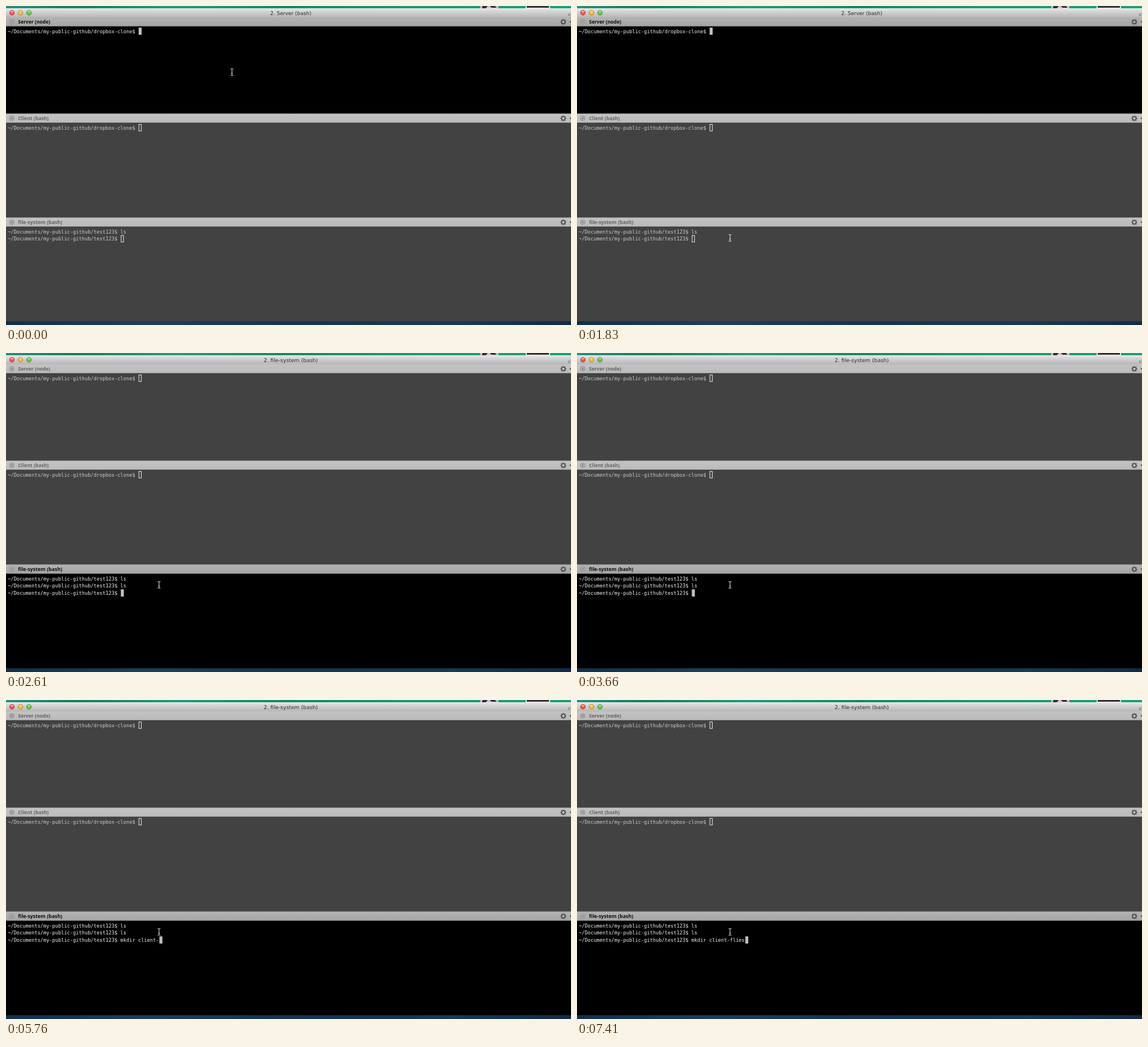
An HTML page for the animation above (8000 ms loop, 996 by 562 pixels).

```html
<!DOCTYPE html>
<html lang="en">
<head>
<meta charset="utf-8">
<title>Terminal panes</title>
<style>
  html, body { margin: 0; width: 100%; height: 100%; overflow: hidden; background: #424242; }
  svg { display: block; width: 100vw; height: 100vh; }
  text { white-space: pre; }
  .mono { font: 8.69px "DejaVu Sans Mono", monospace; }
  .title { font-family: "DejaVu Sans", sans-serif; text-anchor: middle; fill: #2b2b2b; }
  .tab { font-family: "Open Sans", sans-serif; font-weight: 700; }
</style>
</head>
<body>
<svg id="stage" viewBox="0 0 996 562" preserveAspectRatio="none">
  <defs>
    <linearGradient id="sky">
      <stop offset="0" stop-color="#2a8f80"/><stop offset=".12" stop-color="#12805f"/>
      <stop offset=".3" stop-color="#249a7c"/><stop offset=".5" stop-color="#158a63"/>
      <stop offset=".72" stop-color="#1a9a70"/><stop offset="1" stop-color="#19a272"/>
    </linearGradient>
    <linearGradient id="sea">
      <stop offset="0" stop-color="#12304a"/><stop offset=".25" stop-color="#1b4058"/>
      <stop offset=".5" stop-color="#16344e"/><stop offset=".8" stop-color="#153a55"/>
      <stop offset="1" stop-color="#122b44"/>
    </linearGradient>
    <linearGradient id="bar" x2="0" y2="1">
      <stop offset="0" stop-color="#ececec"/><stop offset=".15" stop-color="#dedede"/>
      <stop offset="1" stop-color="#b5b5b5"/>
    </linearGradient>
    <linearGradient id="tabOn" x2="0" y2="1">
      <stop offset="0" stop-color="#b2b2b2"/><stop offset="1" stop-color="#a4a4a4"/>
    </linearGradient>
    <linearGradient id="tabOff" x2="0" y2="1">
      <stop offset="0" stop-color="#c3c3c3"/><stop offset="1" stop-color="#bababa"/>
    </linearGradient>
  </defs>
</svg>
<script>
const LOOP = 8000, CELL = 5.232, LEFT = 3.2, ROW = 12.65;
const stage = document.getElementById('stage');

function add(tag, attrs, parent = stage) {
  const el = document.createElementNS('http://www.w3.org/2000/svg', tag);
  set(el, attrs);
  parent.appendChild(el);
  return el;
}
function set(el, attrs) {
  for (const k in attrs) el.setAttribute(k, attrs[k]);
}
const rect = (x, y, width, height, fill, parent) => add('rect', { x, y, width, height, fill }, parent);
const write = (el, s) => { if (el.textContent !== s) el.textContent = s; };

// Value of the last [time, value] step reached
function at(steps, t) {
  let value = steps[0][1];
  for (const [time, v] of steps) if (t >= time) value = v;
  return value;
}

function drawDesktop() {
  rect(0, 0, 996, 5, 'url(#sky)');
  rect(836, 0, 32, 4, '#cfc3cb');
  add('path', { d: 'M840 0h9l-3 4h-7zM853 0h9l3 3h-9z', fill: '#33283c' });
  rect(916, 0, 43, 4, '#e4e4e4');
  rect(918, 0, 39, 3, '#35313a');
  rect(0, 555, 996, 7, 'url(#sea)');
}

function drawTitleBar() {
  rect(0, 4, 996, 16.5, 'url(#bar)');
  [['#f2564f', '#a8332e'], ['#f5b83c', '#a87a20'], ['#6cc04a', '#3f8330']].forEach(([fill, stroke], i) => {
    const cx = 10.5 + i * 15;
    add('circle', { cx, cy: 12, r: 4.2, fill, stroke, 'stroke-width': .8 });
    add('ellipse', { cx, cy: 10, rx: 2.3, ry: 1.2, fill: '#fff', opacity: .6 });
  });
  add('path', { d: 'M991.5 16.5l5-5M991.5 13v3.5h3.5', fill: 'none', stroke: '#858585' });
  return add('text', { class: 'title', x: 502, y: 15.6 });
}

function drawGear(x, y) {
  const g = add('g', { transform: `translate(${x} ${y})`, stroke: '#484848', fill: 'none' });
  add('circle', { r: 3.1, 'stroke-width': 1.5 }, g);
  for (let a = 0; a < 360; a += 45)
    add('path', { d: 'M0-3.4V-5.2', 'stroke-width': 1.5, transform: `rotate(${a})` }, g);
  add('path', { d: 'M993.2-1.2h4.6l-2.3 3z', fill: '#484848', stroke: 'none', transform: `translate(${-x} 0)` }, g);
}

function makePane(top, bottom, label, size, path) {
  const y = top + 16, prompt = path + '$ ';
  const body = rect(0, y, 996, bottom - y);
  const tab = rect(0, top, 996, 16);
  rect(0, y - .4, 996, .7, '#303030');
  if (top > 30) rect(0, top - .6, 996, .8, '#929292');
  add('circle', { cx: 10.2, cy: top + 7.8, r: 4, fill: '#b9b9b9', stroke: '#797979', 'stroke-width': .8 });
  add('path', { d: `M8.5 ${top + 6.1}l3.4 3.4m0-3.4l-3.4 3.4`, stroke: '#656565', 'stroke-width': 1 });
  const name = add('text', { class: 'tab', x: 21.3, y: top + 11.1, 'font-size': size });
  name.textContent = label;
  drawGear(982.5, top + 8);
  const rows = [0, 1, 2].map(i => add('text', { class: 'mono', x: LEFT, y: y + 11.6 + i * ROW }));
  const caret = add('rect', { 'stroke-width': 1 });

  return (active, lines) => {
    body.setAttribute('fill', active ? '#000' : '#424242');
    tab.setAttribute('fill', active ? 'url(#tabOn)' : 'url(#tabOff)');
    name.setAttribute('fill', active ? '#0c0c0c' : '#646464');
    rows.forEach((row, i) => {
      write(row, i < lines.length ? prompt + lines[i] : '');
      row.setAttribute('fill', active ? '#f0f0f0' : '#cbcbcb');
    });
    const last = lines.length - 1;
    const x = LEFT + .4 + (prompt.length + lines[last].length) * CELL;
    const inset = active ? 0 : .5;
    set(caret, {
      x: x + inset, y: y + 2.1 + last * ROW + inset,
      width: 5.3 - inset * 2, height: 12.6 - inset * 2,
      fill: active ? '#c0c0c0' : 'none', stroke: active ? 'none' : '#ededed'
    });
  };
}

drawDesktop();
const title = drawTitleBar();
const repo = '~/Documents/my-public-github/';
const server = makePane(20, 189.5, 'Server (node)', 8.5, repo + 'dropbox-clone');
const client = makePane(190, 372.5, 'Client (bash)', 8.63, repo + 'dropbox-clone');
const files = makePane(373, 555.3, 'file-system (bash)', 8.86, repo + 'test123');
const pointer = add('path', {
  d: 'M-2.5-6Q0-6 0-4.5Q0-6 2.5-6M0-4.5V4.5M-2.5 6Q0 6 0 4.5Q0 6 2.5 6M-1.2 2h2.4',
  fill: 'none', stroke: '#eee', 'stroke-width': 1
});

const serverInput = [[0, ''], [150, 'l'], [330, 'ls'], [780, 'l'], [930, '']];
const listInput = [[0, ''], [2310, 'l'], [2460, 'ls']];
const dirInput = [
  [0, ''], [3210, 'c'], [3660, ''], [3810, 'm'], [3960, 'mk'],
  [4260, 'mkd'], [4410, 'mkdir'], [4560, 'mkdir '],
  [4860, 'mkdir c'], [5010, 'mkdir cli'], [5160, 'mkdir clie'],
  [5460, 'mkdir clien'], [5610, 'mkdir client'], [5760, 'mkdir client-'],
  [6810, 'mkdir client-fl'], [7110, 'mkdir client-flie'], [7410, 'mkdir client-flies']
];
const pointerPath = [
  [0, [398.3, 116.5]], [1380, [396, 150]], [1530, [282, 322]],
  [1680, [271, 356]], [1830, [269.8, 408.5]]
];
const FOCUS = 1980, RETITLE = 2130, ENTER = 2610;

function draw(t) {
  const onFiles = t >= FOCUS;
  write(title, t < RETITLE ? '2. Server (bash)' : '2. file-system (bash)');
  title.setAttribute('font-size', t < RETITLE ? 9 : 9.3);
  server(!onFiles, [at(serverInput, t)]);
  client(false, ['']);
  const lines = ['ls', at(listInput, t)];
  if (t >= ENTER) lines.push(at(dirInput, t));
  files(onFiles, lines);
  pointer.setAttribute('transform', `translate(${at(pointerPath, t)})`);
}

const start = performance.now();
function tick() {
  draw((performance.now() - start) % LOOP);
  requestAnimationFrame(tick);
}
tick();
</script>
</body>
</html>
```
